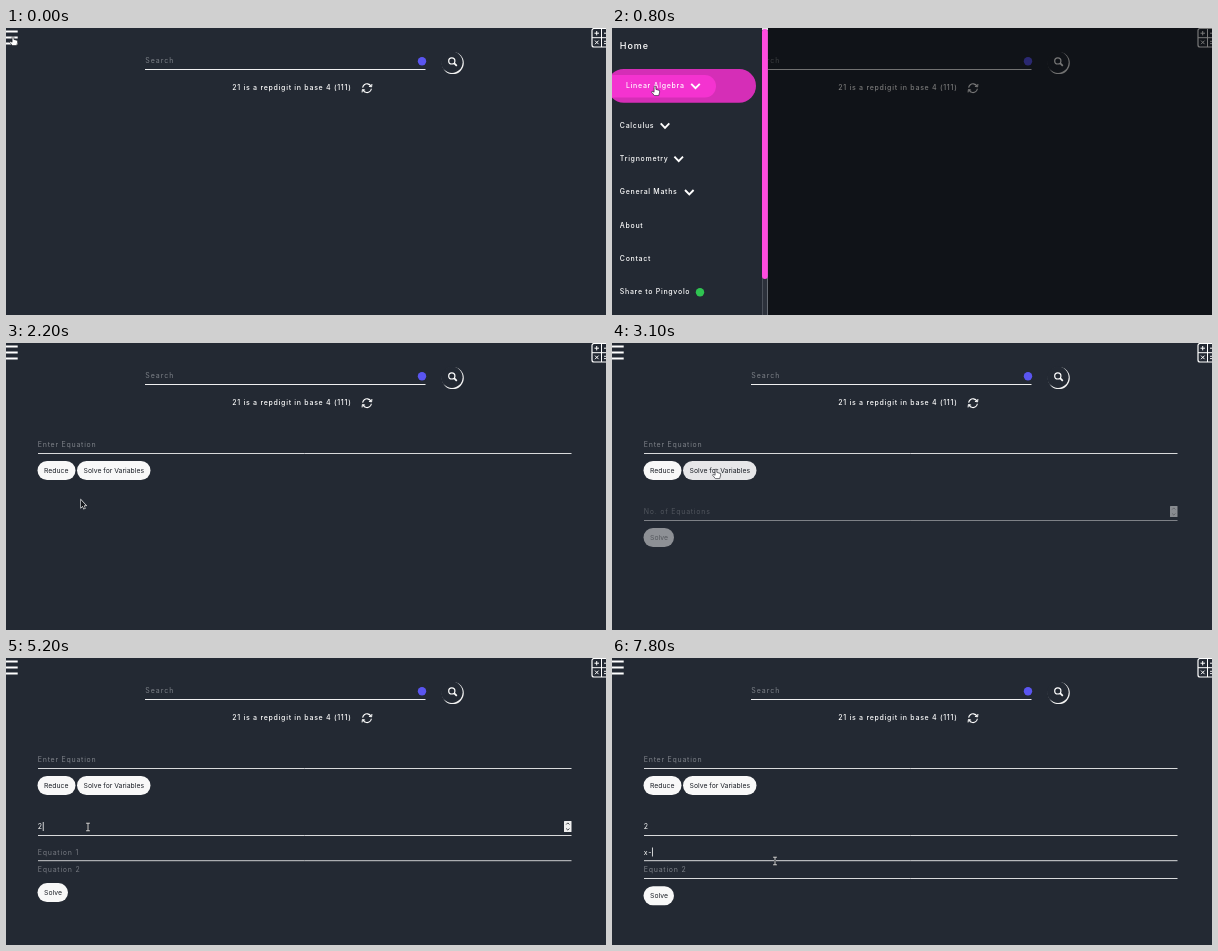
Animation, 600 px wide and 287 px high, one loop 8 s. Source, as an HTML page with a canvas:

```html
<!DOCTYPE html>
<html lang="en">
<head>
<meta charset="utf-8">
<title>Maths helper</title>
<style>
  html, body { margin: 0; width: 100%; height: 100%; overflow: hidden; background: #232933; }
  canvas { display: block; width: 600px; height: 287px; }
</style>
</head>
<body>
<canvas id="stage"></canvas>
<script>
const W = 600, H = 287, LOOP = 8000, STEP = 100;
const BG = '#232933', WHITE = '#fff', GREY = '#7d8188', PINK = '#d52eb7', HOT = '#ff4bdf';
const canvas = document.getElementById('stage');
const ctx = canvas.getContext('2d');
const dpr = window.devicePixelRatio || 1;
canvas.width = W * dpr;
canvas.height = H * dpr;

const clamp = v => Math.max(0, Math.min(1, v));
const mix = (a, b, p) => a + (b - a) * p;
const ease = p => p * p * (3 - 2 * p);
const span = (t, from, to) => ease(clamp((t - from) / (to - from)));
const within = (t, from, to) => t >= from && t < to;

// time, x, y of the pointer tip
const pointerPath = [
  [0, 7, 8], [200, 7, 8], [600, 41, 54], [700, 41, 54], [800, 43, 58],
  [1000, 43, 58], [1400, 34, 151], [1800, 34, 151], [2200, 75, 157],
  [2400, 75, 157], [2800, 104, 126], [3400, 104, 126], [3800, 82, 169],
  [5400, 82, 169], [5500, 84, 192], [5600, 84, 195], [5900, 163, 203]
];

function pointerAt(t) {
  const i = pointerPath.findIndex(k => k[0] > t);
  if (i < 0) return pointerPath[pointerPath.length - 1].slice(1);
  const [t0, x0, y0] = pointerPath[i - 1], [t1, x1, y1] = pointerPath[i];
  const p = ease((t - t0) / (t1 - t0));
  return [mix(x0, x1, p), mix(y0, y1, p)];
}

function text(str, x, midY, { size = 7, gap = 0.75, color = WHITE, weight = 400 } = {}) {
  ctx.font = `${weight} ${size}px Inter, "Open Sans", sans-serif`;
  ctx.letterSpacing = gap + 'px';
  ctx.fillStyle = color;
  ctx.fillText(str, x, midY + size * 0.36);
  return ctx.measureText(str).width;
}

function box(x, y, w, h, r, color) {
  ctx.fillStyle = color;
  ctx.beginPath();
  ctx.roundRect(x, y, w, h, r);
  ctx.fill();
}

function poly(points, color, width, closed) {
  ctx.beginPath();
  points.forEach(([x, y]) => ctx.lineTo(x, y));
  if (closed) ctx.closePath();
  ctx.strokeStyle = color;
  ctx.lineWidth = width;
  ctx.stroke();
}

function disc(x, y, r, color) {
  ctx.fillStyle = color;
  ctx.beginPath();
  ctx.arc(x, y, r, 0, 7);
  ctx.fill();
}

function ring(x, y, r, width, from = 0, to = Math.PI * 2) {
  ctx.beginPath();
  ctx.arc(x, y, r, from, to);
  ctx.strokeStyle = WHITE;
  ctx.lineWidth = width;
  ctx.stroke();
}

const rule = (x0, x1, y, color = '#d9dadc') => poly([[x0, y], [x1, y]], color, 1);
const caret = (x, midY) => box(x, midY - 4.5, 0.8, 9, 0, WHITE);

function button(label, x, y, w, color = '#f8f8f8') {
  box(x, y, w, 19, 9.5, color);
  text(label, x + 6.5, y + 9.5, { size: 6.85, gap: 0, color: '#1b1f26' });
}

function chevron(x, y, flip = 0) {
  const d = mix(2.2, -2.2, flip);
  poly([[x - 4.3, y - d], [x, y + d], [x + 4.3, y - d]], WHITE, 1.9);
}

function heart(x, y) {
  ctx.beginPath();
  ctx.moveTo(x, y + 5.3);
  ctx.bezierCurveTo(x - 9, y - 1.5, x - 4.5, y - 8, x, y - 3);
  ctx.bezierCurveTo(x + 4.5, y - 8, x + 9, y - 1.5, x, y + 5.3);
  ctx.fillStyle = WHITE;
  ctx.fill();
  ctx.strokeStyle = '#c8323c';
  ctx.lineWidth = 0.8;
  ctx.stroke();
}

function refreshIcon(x, y) {
  for (const turn of [0, Math.PI]) {
    ctx.save();
    ctx.translate(x, y);
    ctx.rotate(turn);
    ring(0, 0, 4.4, 1.1, Math.PI * 1.04, Math.PI * 1.86);
    poly([[4.9, -4.2], [4.6, -1.3], [1.9, -1.9]], WHITE, 1);
    ctx.restore();
  }
}

function searchButton(x, y) {
  disc(x + 0.3, y + 0.3, 11, '#f2f2f2');
  disc(x - 0.6, y - 0.6, 10.7, BG);
  ring(x - 0.7, y - 1.9, 3.1, 1.2);
  poly([[x + 1.6, y + 0.4], [x + 4.3, y + 3.1]], WHITE, 1.7);
}

function calcIcon() {
  ctx.beginPath();
  ctx.roundRect(586, 0.5, 19, 18.5, 2);
  ctx.strokeStyle = WHITE;
  ctx.lineWidth = 1.2;
  ctx.stroke();
  poly([[595.5, 0], [595.5, 19]], WHITE, 1);
  poly([[586, 9.7], [605, 9.7]], WHITE, 1);
  poly([[588.5, 5.2], [593, 5.2]], WHITE, 1);
  poly([[590.7, 3], [590.7, 7.4]], WHITE, 1);
  poly([[598, 5.2], [603, 5.2]], WHITE, 1);
  poly([[589, 12.6], [592.6, 16.2]], WHITE, 1);
  poly([[592.6, 12.6], [589, 16.2]], WHITE, 1);
  poly([[598, 13.3], [603, 13.3]], WHITE, 0.9);
  poly([[598, 15.6], [603, 15.6]], WHITE, 0.9);
}

function header() {
  for (const y of [2.5, 8.5, 14.5]) box(0, y, 11.7, 2, 0, WHITE);
  calcIcon();
  text('Search', 139.3, 32.8, { gap: 0.95, color: GREY });
  rule(139, 419.5, 41.5, '#f0f0f1');
  disc(416, 33.3, 4.2, '#5a55f0');
  searchButton(446.5, 34.8);
  text('21 is a repdigit in base 4 (111)', 226.3, 59.8, { gap: 0.72, weight: 500 });
  refreshIcon(361, 60.2);
}

function spinner() {
  box(558, 163, 7.5, 11, 0.5, '#efefef');
  for (const s of [-1, 1])
    poly([[560.2, 168.5 + s * 2], [561.8, 168.5 + s * 3.6], [563.4, 168.5 + s * 2]], '#3c3f44', 1);
}

function equationFields(t) {
  const open = span(t, 4700, 5300);
  if (open > 0) {
    ctx.save();
    ctx.beginPath();
    ctx.rect(0, 179, W, 44 * open);
    ctx.clip();
    ctx.globalAlpha *= open;
    const typed = t >= 7800 ? 'x-' : t >= 6800 ? 'x' : '';
    const w = text(typed || 'Equation 1', 31.8, 194, { color: typed ? WHITE : GREY });
    const lit = within(t, 6100, 6200) || within(t, 6800, 7500) || t >= 7800;
    if (lit) caret(typed ? 31.8 + w - 0.2 : 31.5, 194);
    text('Equation 2', 31.8, 211.7, { color: GREY });
    rule(32, 565.5, 202.7);
    rule(32, 565.5, 220.5);
    ctx.restore();
  }
  button('Solve', 31.5, mix(185, 228.3, open), 30.5);
}

function systemForm(t) {
  const shown = span(t, 2800, 3400);
  if (!shown) return;
  ctx.save();
  ctx.globalAlpha = shown;
  const filled = t >= 4800;
  text(filled ? '2' : 'No. of Equations', 31.8, 168.5, { color: filled ? WHITE : GREY });
  if (within(t, 3900, 4400)) caret(31.5, 168.5);
  if (within(t, 4800, 5300)) caret(36.8, 168.5);
  if (t < 5500) spinner();
  rule(32, 565.5, 177.5);
  equationFields(t);
  ctx.restore();
}

function equationPage(t) {
  text('Enter Equation', 31.8, 101.3, { color: GREY });
  rule(32, 565.5, 110.5);
  button('Reduce', 31.5, 118, 38);
  button('Solve for Variables', 71, 118, 73.5, within(t, 2800, 3600) ? '#e6e6e8' : '#f8f8f8');
  systemForm(t);
}

function submenu(open, hover) {
  ctx.save();
  ctx.beginPath();
  ctx.rect(0, 79, 150, 103 * open);
  ctx.clip();
  rule(0, 145, 81, '#a3a6aa');
  rule(0, 145, 178.8, '#a3a6aa');
  const style = { size: 6.6, gap: 0.6, weight: 500 };
  text('Matrix', 7.8, 107.3, style);
  const w = text('Play with Equations', 7.8, 152.3, { ...style, color: hover ? '#f58be2' : WHITE });
  if (hover) rule(7.8, 7.8 + w, 156, HOT);
  heart(128.5, 107.8);
  heart(128.5, 152.8);
  ctx.restore();
}

function sidebar(t) {
  const shown = span(t, 0, 600) - span(t, 1600, 2200);
  if (shown <= 0) return;
  const open = span(t, 800, 1400), dy = 103 * open;
  ctx.fillStyle = `rgba(0, 0, 0, ${0.53 * shown})`;
  ctx.fillRect(0, 0, W, H);

  ctx.save();
  ctx.translate(-156 * (1 - shown), 0);
  box(0, 0, 156, H, 0, BG);
  if (t >= 800) {
    box(-5, 41, 149, 33.7, 16.8, PINK);
    const glow = 1 - span(t, 800, 1200);
    if (glow) box(-9, 47, 113, 22.5, 11.2, `rgba(255, 52, 217, ${0.75 * glow})`);
  }
  const style = { gap: 0.7, weight: 500 };
  text('Home', 7.8, 17.5, { size: 9, gap: 0.9, weight: 500 });
  text('Linear Algebra', t >= 800 ? 14 : 7.8, 57.5, style);
  chevron(t >= 800 ? 83.5 : 77.3, 58, open);
  if (open) submenu(open, within(t, 1400, 2200));

  const items = [['Calculus', 53], ['Trignometry', 66.7], ['General Maths', 77.3], ['About'], ['Contact'], ['Share to Pingvolo']];
  items.forEach(([label, icon], i) => {
    const y = 97.3 + i * 33.3 + dy;
    text(label, 7.8, y, style);
    if (icon) chevron(icon, y + 0.3);
  });
  disc(88, 264.3 + dy, 4.2, '#2fc351');

  box(150, 0, 6, H, 0, '#2b303a');
  poly([[150.5, 0], [150.5, H]], '#555a62', 0.8);
  poly([[155.5, 0], [155.5, H]], '#777b82', 0.8);
  box(150, 0, 6, 2, 0, '#e6e6e8');
  box(150, 1, 5.8, mix(250, 194, open), 2.9, HOT);
  ctx.restore();
}

function hand() {
  ctx.beginPath();
  [[-0.9, 0.6], [0, 0], [0.9, 0.6], [0.9, 3.4], [4.4, 4.4], [4.7, 6], [3.7, 9.6],
   [-0.6, 9.6], [-3.4, 6.2], [-2.8, 5.2], [-0.9, 6.2]].forEach(p => ctx.lineTo(...p));
  ctx.closePath();
  ctx.fillStyle = WHITE;
  ctx.fill();
  ctx.strokeStyle = '#16191f';
  ctx.lineWidth = 0.6;
  ctx.stroke();
}

function arrow() {
  const shape = [[0, 0], [0, 7.6], [1.7, 6.1], [2.9, 8.8], [4, 8.3], [2.9, 5.6], [5, 5.5]];
  poly(shape, WHITE, 1.1, true);
  ctx.fillStyle = '#15181d';
  ctx.fill();
}

function beam() {
  for (const [color, width] of [['#11141a', 2], ['#f4f4f4', 0.9]]) {
    poly([[0, -3.6], [0, 3.6]], color, width);
    for (const y of [-3.8, 3.8]) poly([[-1.9, y], [1.9, y]], color, width);
  }
}

function pointer(t) {
  const onLink = t < 1900 || within(t, 2800, 3600);
  const onField = t >= 3800;
  ctx.save();
  ctx.translate(...pointerAt(t));
  (onLink ? hand : onField ? beam : arrow)();
  ctx.restore();
}

function draw(t) {
  ctx.setTransform(dpr, 0, 0, dpr, 0, 0);
  ctx.fillStyle = BG;
  ctx.fillRect(0, 0, W, H);
  header();
  if (t >= 1700) equationPage(t);
  sidebar(t);
  pointer(t);
}

const start = performance.now();
function tick() {
  const t = (performance.now() - start) % LOOP;
  draw(Math.floor(t / STEP) * STEP);
  requestAnimationFrame(tick);
}
tick();
</script>
</body>
</html>
```
